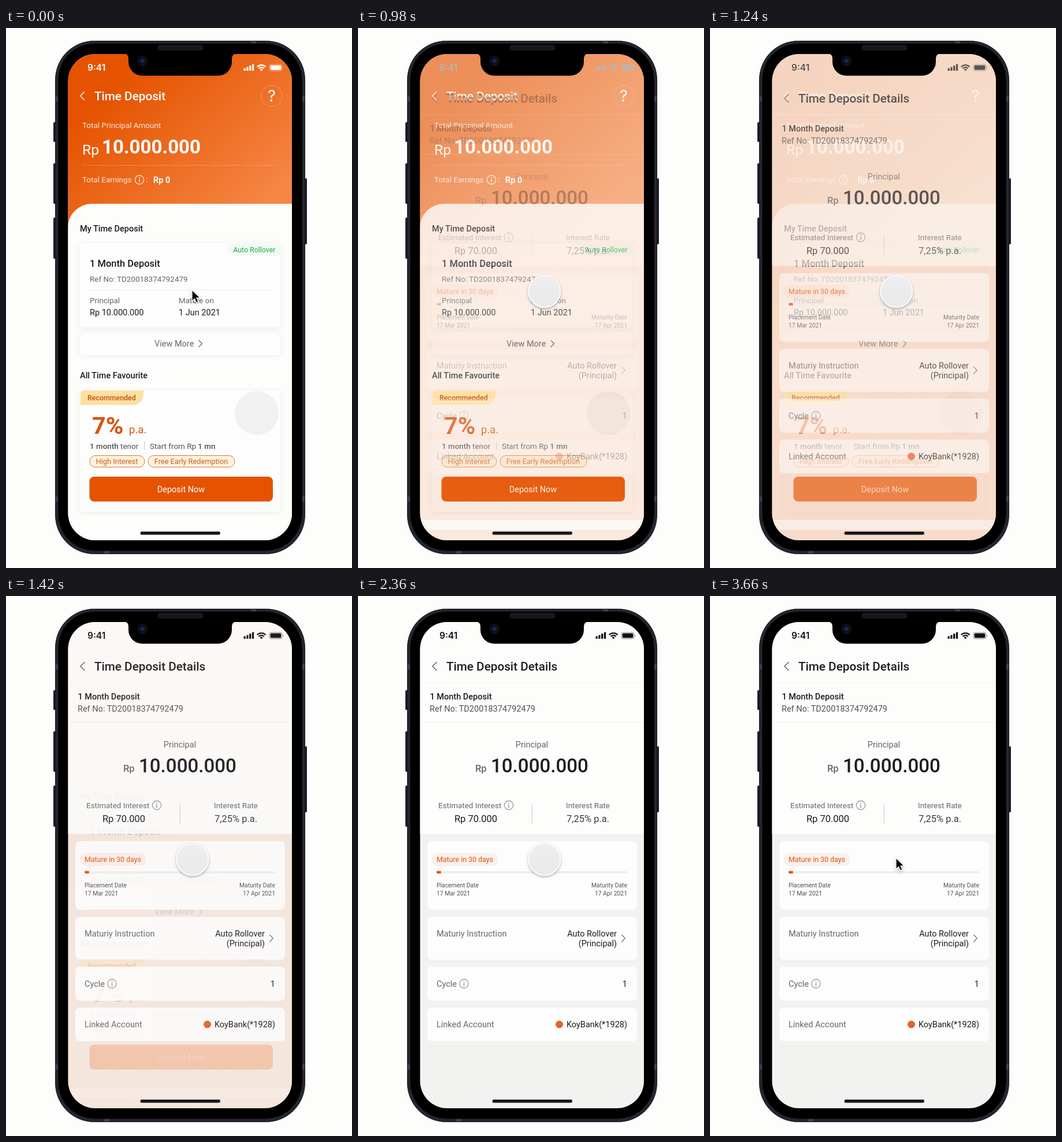
An HTML page for the animation above (3680 ms loop, 599x934 px).

```html
<!DOCTYPE html>
<html lang="en">
<head>
<meta charset="utf-8">
<title>Time Deposit</title>
<style>
  html, body { margin: 0; width: 100%; height: 100%; overflow: hidden; background: #fdfdfc; }
  svg { display: block; width: 599px; height: 934px; --p: 0; --in: 0; --out: 1; }
  text { font-family: Roboto, sans-serif; font-size: 14.5px; fill: #1c1c20; white-space: pre; }
  .home > * { opacity: var(--out); }
  .home > .bg { opacity: calc(1 - var(--p)); }
  .details > * { opacity: var(--in); }
  .details > .bg { opacity: var(--p); }
  .s10 { font-size: 10.35px; }
  .s12 { font-size: 12.4px; }
  .s13 { font-size: 13.45px; }
  .s16 { font-size: 16.5px; }
  .s20 { font-size: 20.7px; }
  .s33 { font-size: 33.1px; }
  .m { font-weight: 500; }
  .b { font-weight: 700; }
  .g { fill: #66666a; }
  .d { fill: #505054; }
  .w { fill: #fff; }
  .o { fill: #d9530e; }
  .mid { text-anchor: middle; }
  .end { text-anchor: end; }
  .line { fill: none; stroke-width: 1.3; stroke-linecap: round; stroke-linejoin: round; }
  .clock { font: 600 15.5px Inter, sans-serif; fill: currentColor; }
  .help { font: 400 27px Inter, sans-serif; }
  .card { fill: #fdfdfd; filter: url(#soft); }
</style>
</head>
<body>
<svg viewBox="0 0 599 934">
  <defs>
    <clipPath id="screen"><rect x="107.500" y="45" width="387.500" height="841" rx="47"/></clipPath>
    <linearGradient id="orange" gradientUnits="userSpaceOnUse" x1="200" y1="90" x2="420" y2="330">
      <stop offset="0" stop-color="#e55300"/>
      <stop offset="1" stop-color="#f58644"/>
    </linearGradient>
    <linearGradient id="knob" x2="0" y2="1">
      <stop offset="0" stop-color="#eee"/>
      <stop offset="1" stop-color="#e9e9e9"/>
    </linearGradient>
    <filter id="soft" x="-10%" y="-20%" width="120%" height="150%">
      <feDropShadow dx="0" dy="1" stdDeviation="4" flood-color="#20203a" flood-opacity=".08"/>
    </filter>
    <filter id="drop" x="-40%" y="-40%" width="180%" height="180%">
      <feDropShadow dx="0" dy="2" stdDeviation="2" flood-opacity=".3"/>
    </filter>
    <g id="status" fill="currentColor">
      <rect x="411.5" y="69.500" width="3.300" height="4.500" rx="1"/>
      <rect x="416.300" y="67.500" width="3.300" height="6.500" rx="1"/>
      <rect x="421.100" y="65" width="3.300" height="9" rx="1"/>
      <rect x="425.900" y="62.500" width="3.300" height="11.500" rx="1"/>
      <g fill="none" stroke="currentColor" stroke-width="2.200">
        <path d="M434.800 67.200a10.400 10.400 0 0 1 14.800 0"/>
        <path d="M437.600 70a6.400 6.400 0 0 1 9.200 0"/>
      </g>
      <path d="M439.700 72a3.600 3.600 0 0 1 5 0l-2.500 2.500z"/>
      <rect x="456" y="63" width="22" height="11" rx="3" fill="none" stroke="currentColor" stroke-opacity=".45"/>
      <rect x="457.600" y="64.600" width="18.800" height="7.800" rx="1.700"/>
      <path d="M479.500 66.500q1.600 2 0 4z" opacity=".6"/>
    </g>
    <g id="info">
      <circle r="7.600" fill="none" stroke="currentColor" stroke-width="1.100"/>
      <path d="M0-.9V4" stroke="currentColor" stroke-width="1.400"/>
      <circle cy="-3.600" r="1" fill="currentColor"/>
    </g>
  </defs>

  <!-- phone body -->
  <g fill="#1b1e25">
    <rect x="82" y="163" width="5" height="34" rx="1.500"/>
    <rect x="82" y="234" width="5" height="70" rx="1.500"/>
    <rect x="82" y="328" width="5" height="71" rx="1.500"/>
    <rect x="516" y="260" width="5" height="114" rx="1.500"/>
  </g>
  <rect x="85.500" y="22.500" width="432" height="887" rx="67" fill="#23272f" stroke="#14161b"/>
  <path d="M86 118h5v9h-5zM86 810h5v9h-5zM512 118h5v9h-5zM512 810h5v9h-5zM424 23h9v4h-9zM170 904h9v5h-9z" fill="#3d424c"/>
  <rect x="90.500" y="27" width="422" height="877" rx="63" stroke="#0c0d11"/>

  <g clip-path="url(#screen)">
    <rect x="107" y="45" width="388" height="841" fill="#f2f2f1"/>

    <g class="home">
      <rect class="bg" x="107" y="45" width="388" height="841" fill="url(#orange)"/>
      <g class="bg">
        <path d="M107 345.500a41.500 41.500 0 0 1 41.500-41.500H495V886H107z" fill="#fdfdfc"/>
        <rect class="card" x="127.500" y="372" width="348" height="146" rx="6"/>
        <rect class="card" x="127.500" y="526" width="348" height="40" rx="8"/>
        <rect class="card" x="127.500" y="627" width="348" height="210" rx="6"/>
        <path d="M384 373H470a5 5 0 0 1 5 5V394H396a12 12 0 0 1-12-12z" fill="#f1faf4"/>
        <circle cx="434" cy="666" r="38" fill="#f1f1f1"/>
      </g>
      <rect class="bg" x="107" y="851" width="388" height="17" fill="#fdfdfc"/>

      <g color="#fff"><text class="clock" x="141" y="73.500">9:41</text><use href="#status"/></g>
      <path class="line" d="M135.500 110.500l-7 7 7 7" stroke="#fff"/>
      <text class="s20 m w" x="153" y="124.500">Time Deposit</text>
      <g>
        <circle cx="460" cy="117.500" r="18" fill="none" stroke="#fff" stroke-opacity=".25"/>
        <text class="help w mid" x="460" y="127">?</text>
      </g>
      <text class="s13 w" x="132" y="173" fill-opacity=".85">Total Principal Amount</text>
      <text class="w" x="132" y="218.500" style="font-size:24.800px">Rp</text>
      <text class="s33 b w" x="166" y="217">10.000.000</text>
      <path d="M132 237.500H467" stroke="#fff" stroke-opacity=".35" stroke-dasharray="3 2"/>
      <text class="s13 w" x="132" y="266.500" fill-opacity=".85">Total Earnings</text>
      <use href="#info" x="231" y="262.500" color="#fff"/>
      <text class="w" x="242" y="267">:</text>
      <text class="b w" x="255" y="267.500">Rp 0</text>

      <text class="m" x="128" y="351.500">My Time Deposit</text>
      <text class="s12 end" x="466.500" y="388" style="fill:#22ab42">Auto Rollover</text>
      <text class="s16 m" x="145" y="413">1 Month Deposit</text>
      <text class="s13 g" x="145" y="438.500">Ref No: TD20018374792479</text>
      <path d="M145 453H459" stroke="#ebebeb"/>
      <text class="s13 g" x="145" y="476">Principal</text>
      <text class="s13 g" x="299" y="476">Mature on</text>
      <text x="145" y="497">Rp 10.000.000</text>
      <text x="299" y="497">1 Jun 2021</text>
      <text class="g" x="257" y="551">View More</text>
      <path class="line" d="M334 540.500l5.500 5.500-5.500 5.500" stroke="#66666a"/>

      <text class="m" x="128" y="606">All Time Favourite</text>
      <path d="M129 652V633a6 6 0 0 1 6-6H238V634a18 18 0 0 1-18 18z" fill="#fce0a2"/>
      <text class="s12 m" x="141" y="643.500" style="fill:#c9500c">Recommended</text>
      <text class="b o" x="149" y="701.500" style="font-size:41.400px">7%</text>
      <text class="o" x="213" y="701" style="font-size:18.600px">p.a.</text>
      <text class="s13 d" x="145" y="728"><tspan class="m">1 month</tspan> tenor</text>
      <path d="M239.500 715.500V730" stroke="#c4c4c4"/>
      <text class="s13 d" x="249" y="728">Start from Rp <tspan class="m">1 mn</tspan></text>
      <g fill="#f5b942" fill-opacity=".17" stroke="#d77a35">
        <rect x="145" y="739.500" width="95" height="20" rx="10"/>
        <rect x="246" y="739.500" width="150" height="20" rx="10"/>
      </g>
      <text x="192" y="753.500" class="s13 mid" style="fill:#cf5c17;font-size:12.800px">High Interest</text>
      <text x="320.500" y="753.500" class="s13 mid" style="fill:#cf5c17;font-size:12.800px">Free Early Redemption</text>
      <rect x="144.500" y="776" width="317.500" height="43" rx="8" fill="#e55300"/>
      <text class="w mid" x="303" y="803">Deposit Now</text>
    </g>

    <g class="details">
      <rect class="bg" x="107" y="45" width="388" height="366.500" fill="#fdfdfc"/>
      <g class="bg" fill="#fdfdfd">
        <rect x="120" y="424" width="363" height="118.500" rx="8"/>
        <rect x="120" y="555" width="363" height="74" rx="8"/>
        <rect x="120" y="641" width="363" height="59" rx="8"/>
        <rect x="120" y="712" width="363" height="58" rx="8"/>
      </g>
      <g color="#111"><text class="clock" x="141" y="73.500">9:41</text><use href="#status"/></g>
      <path class="line" d="M136 114.500l-7 7 7 7" stroke="#55555a"/>
      <text class="s20 m" x="153" y="129">Time Deposit Details</text>
      <path class="bg" d="M107 150H495" stroke="#f4f3ec"/>
      <text class="m" x="124.500" y="178.500">1 Month Deposit</text>
      <text class="d" x="124" y="199.500">Ref No: TD20018374792479</text>
      <path class="bg" d="M107 218.500H495" stroke="#ecebe5"/>
      <text class="g mid" x="301" y="262">Principal</text>
      <text class="s16 m g" x="203" y="304">Rp</text>
      <text class="s33 m" x="230" y="304.500">10.000.000</text>
      <text class="s13 g" x="139" y="366.500">Estimated Interest</text>
      <use href="#info" x="261" y="362" color="#8a8a8a"/>
      <text class="s16 mid" x="204" y="391">Rp 70.000</text>
      <path d="M301.500 360V393" stroke="#c9c9c9"/>
      <text class="s13 g mid" x="398" y="366.500">Interest Rate</text>
      <text class="s16 mid" x="398" y="391" style="fill:#3a3a3e">7,25% p.a.</text>

      <path d="M139 444H231a11.500 11.500 0 0 1 0 23H150l-5 4-5-4h-1a11.500 11.500 0 0 1 0-23z" fill="#e55300" fill-opacity=".07"/>
      <text class="s12 o" x="136" y="460">Mature in 30 days</text>
      <rect x="136" y="476" width="330" height="4" rx="2" fill="#ededf0"/>
      <rect x="136" y="475.500" width="8" height="4.500" rx="2" fill="#e55300"/>
      <text class="s10 d" x="136" y="503.500">Placement Date</text>
      <text class="s10 d" x="136" y="518">17 Mar 2021</text>
      <text class="s10 d end" x="466" y="503.500">Maturity Date</text>
      <text class="s10 d end" x="466" y="518">17 Apr 2021</text>
      <text class="g" x="136" y="589">Maturiy Instruction</text>
      <text class="end" x="448" y="589">Auto Rollover</text>
      <text class="end" x="448" y="605.500">(Principal)</text>
      <path class="line" d="M456.500 586l5.800 6-5.800 6" stroke="#77777a"/>
      <text class="g" x="136" y="676">Cycle</text>
      <use href="#info" x="183.500" y="670.500" color="#8a8a8a"/>
      <text class="end" x="466" y="676">1</text>
      <text class="g" x="136" y="746">Linked Account</text>
      <circle cx="348.500" cy="741" r="6.500" fill="#e4622a"/>
      <text class="end" x="466" y="746">KoyBank(*1928)</text>
    </g>

    <rect x="232.500" y="871" width="138.500" height="5.500" rx="2.750" fill="#17171b"/>
  </g>

  <!-- notch -->
  <path d="M204 44Q212 45 212 53V59A24 24 0 0 0 236 82.500H367A24 24 0 0 0 391 59V53Q391 45 399 44z"/>
  <rect x="263.500" y="30" width="77" height="8" rx="3" fill="#17181b" stroke="#26272b"/>
  <circle cx="236" cy="57" r="8.500" fill="#0b0e19" stroke="#161a28"/>
  <circle cx="236" cy="57" r="3.500" fill="#15265a"/>

  <circle id="touch" cx="322.800" cy="455.500" r="27.500" fill="url(#knob)" stroke="#fafafa" stroke-width="2" filter="url(#drop)"/>
  <path id="arrow" d="M322 453v19.500l4.600-4.300 2.900 6.700 3.500-1.500-2.900-6.500h6z" stroke="#fff" stroke-width="1.200" filter="url(#drop)"/>
</svg>
<script>
  const LOOP = 3680, FADE_START = 18, FADE_STEPS = 15.2, CURVE = 1.6;
  const TOUCH_ON = 10, TOUCH_OFF = 71;
  const svg = document.querySelector('svg');
  const touch = document.getElementById('touch');
  const arrow = document.getElementById('arrow');

  // Steps come in threes lasting 20, 20 and 100 ms.
  function stepAt(ms) {
    const t = ms + 20;
    return 3 * Math.floor(t / 140) + Math.min(2, Math.floor(t % 140 / 20)) - 1;
  }

  function draw() {
    const step = stepAt(performance.now() % LOOP);
    const p = Math.min(1, Math.max(0, (step - FADE_START) / FADE_STEPS));
    const touching = step >= TOUCH_ON && step < TOUCH_OFF;
    // Nested layers keep the content stronger than its backdrop.
    svg.style.setProperty('--p', p);
    svg.style.setProperty('--in', 1 - (1 - p) ** CURVE);
    svg.style.setProperty('--out', 1 - p ** CURVE);
    touch.style.display = touching ? '' : 'none';
    arrow.style.display = touching ? 'none' : '';
    requestAnimationFrame(draw);
  }
  draw();
</script>
</body>
</html>
```
